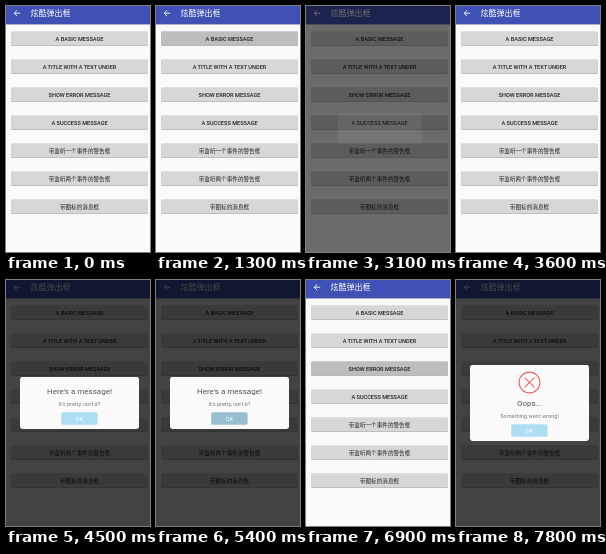
Animation of 144x246 px, one loop 8000 ms. Source, as an HTML page:

```html
<!DOCTYPE html>
<html lang="zh-CN">
<head>
<meta charset="utf-8">
<title>Dialog demo</title>
<style>
  html, body { margin: 0; width: 100%; height: 100%; overflow: hidden; background: #fafafa; }
  svg { display: block; width: 100vw; height: 100vh; }
  text { font-family: Roboto, "Noto Sans CJK SC", "Noto Sans CJK", sans-serif; font-size: 5.6px; }
  .label { font-weight: 500; fill: #212121; text-anchor: middle; }
  .dialog text { text-anchor: middle; }
  .dialog .title { font-size: 8px; fill: #575757; }
  .dialog .body { fill: #797979; }
  .dialog .ok { fill: #fff; }
</style>
</head>
<body>
<svg id="stage" viewBox="0 0 144 246" preserveAspectRatio="none"></svg>
<script>
const LOOP = 8000;
const CENTER = 73.5;
const BUTTON = '#d6d7d7', BUTTON_PRESSED = '#bcbdbd';
const OK = '#aedef4', OK_PRESSED = '#96bfd2';
const DIMMED = 0.73, FADING = 0.57;
const stage = document.getElementById('stage');

function add(parent, tag, attrs, content) {
  const node = document.createElementNS('http://www.w3.org/2000/svg', tag);
  for (const key in attrs) node.setAttribute(key, attrs[key]);
  if (content) node.textContent = content;
  return parent.appendChild(node);
}

function box(parent, x, y, width, height, rx, fill) {
  return add(parent, 'rect', { x, y, width, height, rx, fill });
}

function write(parent, className, y, content) {
  return add(parent, 'text', { class: className, x: CENTER, y }, content);
}

// Page: toolbar and button list
box(stage, 0, 0, 144, 246, 0, '#fafafa');
box(stage, 0, 18, 144, 1, 0, '#dcdcdf');
box(stage, 0, 0, 144, 18.3, 0, '#3f51b5');
add(stage, 'path', {
  d: 'M14.2 7.2H8.4M11.2 4.2L8.2 7.2L11.2 10.2',
  fill: 'none', stroke: '#fff', 'stroke-width': 0.9
});
add(stage, 'text', { x: 24.5, y: 10, fill: '#fff', style: 'font-size:8px;font-weight:500' }, '炫酷弹出框');

const buttons = [
  'A BASIC MESSAGE', 'A TITLE WITH A TEXT UNDER', 'SHOW ERROR MESSAGE', 'A SUCCESS MESSAGE',
  '带监听一个事件的警告框', '带监听两个事件的警告框', '带图标的消息框'
].map((label, i) => {
  const y = 25.3 + i * 28;
  box(stage, 5.2, y + 0.7, 136.6, 14, 0.8, '#b4b5b5');
  const face = box(stage, 5.2, y, 136.6, 14, 0.8, BUTTON);
  write(stage, 'label', y + 9.7, label);
  return face;
});

const dim = box(stage, 0, 0, 144, 246, 0, '#000');
const ghost = box(stage, 32, 107, 83.5, 30.5, 1.7, '#fff');
ghost.setAttribute('opacity', 0.06);

function makeDialog(top, bottom, title, titleY, body, bodyY) {
  const group = add(stage, 'g', { class: 'dialog' });
  box(group, 14, top, 119, bottom - top, 2.4, '#fafafa');
  write(group, 'title', titleY, title);
  if (body) write(group, 'body', bodyY, body);
  const ok = box(group, 55.2, bottom - 16.7, 36.4, 12.5, 1.6, OK);
  write(group, 'ok', bottom - 8.4, 'OK');
  return { group, ok };
}

const message = makeDialog(101, 145, "Here's a message!", 117.5);
const titled = makeDialog(97, 149, "Here's a message!", 113.5, "It's pretty, isn't it?", 126);
const failure = makeDialog(85, 161, 'Oops...', 125.6, 'Something went wrong!', 138);
const icon = add(failure.group, 'g', { fill: 'none', stroke: '#ee6363', 'stroke-width': 1.1 });
add(icon, 'circle', { cx: CENTER, cy: 102.5, r: 10.4 });
const cross = add(icon, 'path', { d: 'M69.2 98.2L77.8 106.8M77.8 98.2L69.2 106.8', 'stroke-linecap': 'round' });
const dialogs = [message, titled, failure];

const steps = [
  { at: 0 },
  { at: 1300, press: 0 },
  { at: 1800, dim: DIMMED, dialog: message },
  { at: 3100, dim: FADING, ghost: true },
  { at: 3600 },
  { at: 4500, dim: DIMMED, dialog: titled },
  { at: 5400, dim: DIMMED, dialog: titled, pressOk: true },
  { at: 5900 },
  { at: 6900, press: 2 },
  { at: 7200, dim: DIMMED, dialog: failure },
  { at: 7800, dim: DIMMED, dialog: failure, cross: true }
];

function show(node, visible) {
  node.setAttribute('display', visible ? 'inline' : 'none');
}

function render(time) {
  const step = steps.findLast(s => s.at <= time);
  buttons.forEach((face, i) => face.setAttribute('fill', i === step.press ? BUTTON_PRESSED : BUTTON));
  dim.setAttribute('opacity', step.dim || 0);
  show(ghost, step.ghost);
  for (const dialog of dialogs) {
    show(dialog.group, dialog === step.dialog);
    dialog.ok.setAttribute('fill', step.pressOk ? OK_PRESSED : OK);
  }
  show(cross, step.cross);
}

const start = performance.now();
function tick() {
  render((performance.now() - start) % LOOP);
  requestAnimationFrame(tick);
}
tick();
</script>
</body>
</html>
```
